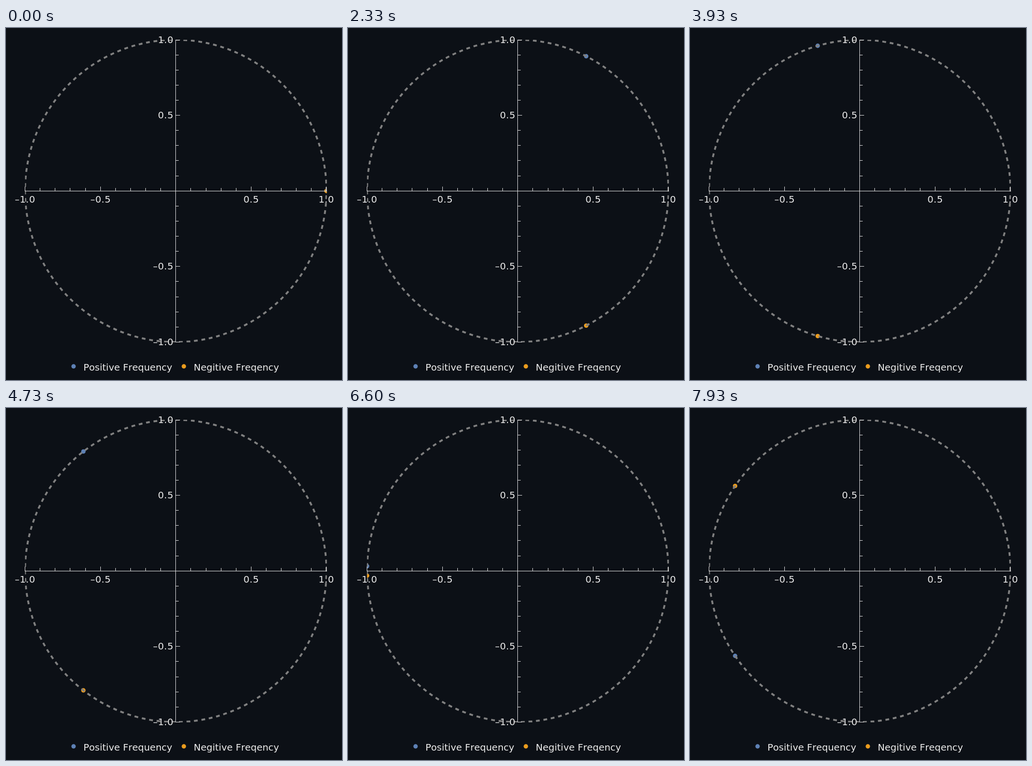
Recreate the animation shown at these times as an HTML page with a canvas. Size 716 by 748 pixels, loop 8 s.

```html
<!DOCTYPE html>
<html lang="en">
<head>
<meta charset="utf-8">
<title>Positive and negative frequency</title>
<style>
html, body { margin: 0; width: 100%; height: 100%; overflow: hidden; background: #0c1016; }
canvas { display: block; }
</style>
</head>
<body>
<canvas id="stage" width="716" height="748"></canvas>
<script>
const ctx = document.getElementById('stage').getContext('2d');
const W = 716, H = 748, LOOP = 8000;
const CX = 361.77, CY = 346.21, R = 321.2, DASH = 8;
const BLUE = '#5e81b5', ORANGE = '#eb9c1e', GREY = '#808080', LIGHT = '#ebebeb';

// 15 steps per second, rounded to 10 ms
function stepAt(t) {
  const rest = t % 200;
  return 3 * Math.floor(t / 200) + (rest >= 70) + (rest >= 130);
}

function dot(x, y, color) {
  ctx.fillStyle = color;
  ctx.beginPath();
  ctx.arc(x, y, 4.7, 0, 2 * Math.PI);
  ctx.fill();
}

function text(str, x, y, align, spacing) {
  ctx.font = '20px "DejaVu Sans", sans-serif';
  ctx.fontKerning = 'none';
  ctx.letterSpacing = spacing + 'px';
  ctx.textAlign = align;
  ctx.fillText(str, x, y);
}

function drawCircle() {
  ctx.strokeStyle = GREY;
  ctx.lineWidth = 4;
  ctx.setLineDash([DASH, DASH]);
  ctx.beginPath();
  ctx.arc(CX, CY, R, 0, -2 * Math.PI, true);
  ctx.stroke();
  ctx.setLineDash([]);
}

function drawAxes() {
  ctx.fillStyle = LIGHT;
  ctx.fillRect(40, 346, 644, 1);
  ctx.fillRect(361, 25, 1, 643);
  for (let k = -10; k <= 10; k++) {
    if (k === 0) continue;
    const x = Math.floor(CX + k * R / 10);
    const y = Math.floor(CY - k * R / 10);
    const major = k % 5 === 0;
    const len = major ? 10 : 7;
    ctx.fillRect(x, 347 - len, 1, len);
    ctx.fillRect(361, y, len, 1);
    if (major) {
      const label = (k < 0 ? '\u2013' : '') + Math.abs(k / 10).toFixed(1);
      text(label, x + 0.5, 370.5, 'center', 0.45);
      text(label, 356.8, y + 7, 'right', 0.45);
    }
  }
}

function drawLegend() {
  dot(144, 719, BLUE);
  dot(379, 719, ORANGE);
  ctx.fillStyle = LIGHT;
  text('Positive Frequency', 165, 728, 'left', 0);
  text('Negitive Freqency', 400, 728, 'left', 0);
}

function draw(t) {
  const angle = stepAt(t) * Math.PI / 100;
  const x = CX + R * Math.cos(angle);
  const dy = R * Math.sin(angle);
  ctx.fillStyle = '#0c1016';
  ctx.fillRect(0, 0, W, H);

  ctx.save();
  ctx.beginPath();
  ctx.rect(40.5, 25, 643.3, 643);
  ctx.clip();
  dot(x, CY - dy, BLUE);
  dot(x, CY + dy, ORANGE);
  drawCircle();
  ctx.restore();

  drawAxes();
  drawLegend();
}

const start = performance.now();
function tick() {
  draw((performance.now() - start) % LOOP);
  requestAnimationFrame(tick);
}
tick();
</script>
</body>
</html>
```
